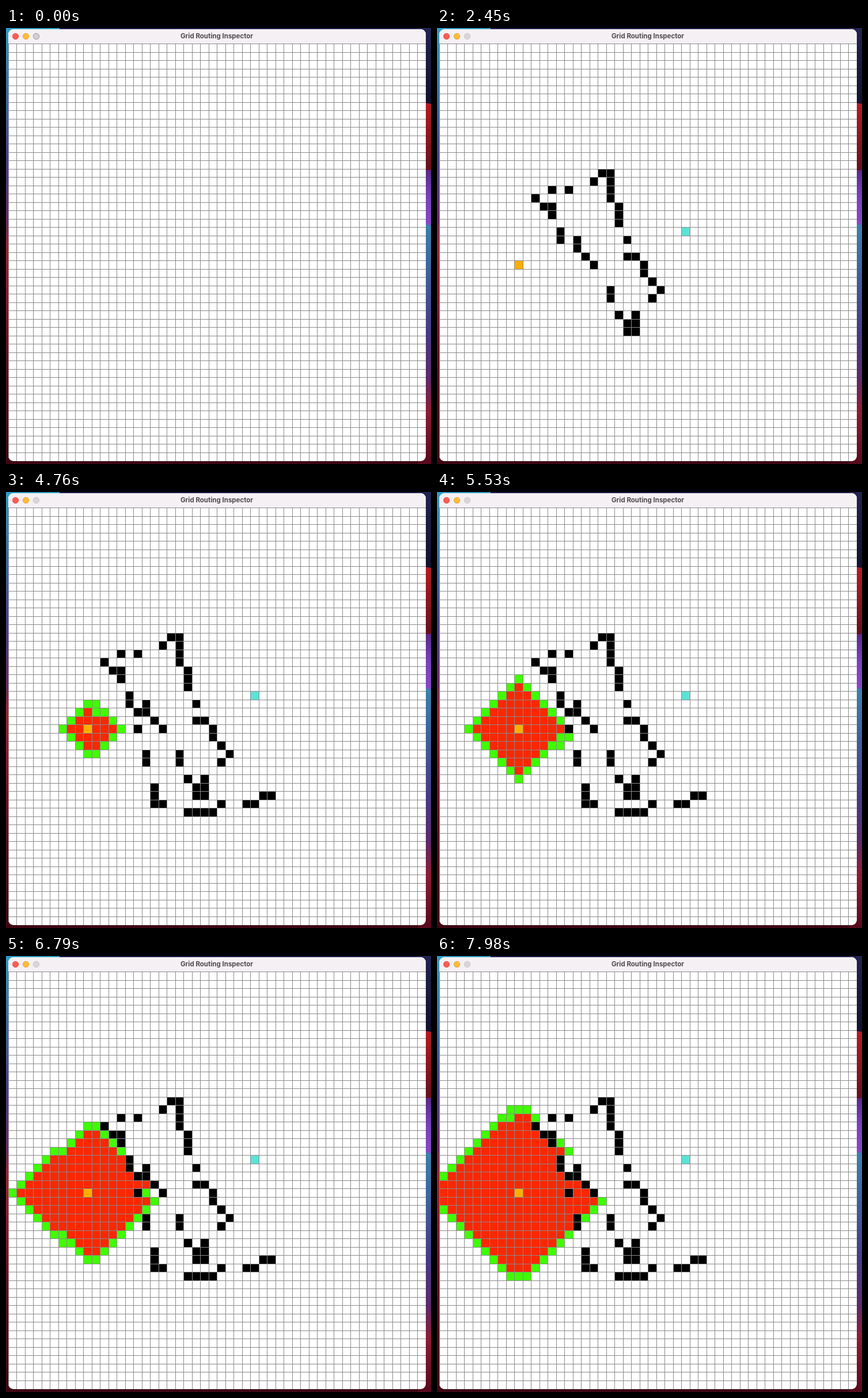
Animation of 738 by 758 pixels, one loop 8 s. Source, as an HTML page:

```html
<!DOCTYPE html>
<html lang="en">
<head>
<meta charset="utf-8">
<title>Grid Routing Inspector</title>
<style>
  html, body { margin: 0; width: 100%; height: 100%; overflow: hidden; background: #3f0714; }
  svg { display: block; position: absolute; left: 0; top: 0; }
  text { font: 700 11.5px Inter, "Open Sans", sans-serif; fill: #4d494d; }
</style>
</head>
<body>
<svg width="738" height="758" viewBox="0 0 738 758">
  <defs>
    <linearGradient id="left" x1="0" y1="0" x2="0" y2="1">
      <stop offset="0" stop-color="#2c9cc4"/>
      <stop offset=".12" stop-color="#3578ae"/>
      <stop offset=".3" stop-color="#47408c"/>
      <stop offset=".44" stop-color="#6a2a66"/>
      <stop offset=".5" stop-color="#a0242e"/>
      <stop offset=".6" stop-color="#93182a"/>
      <stop offset=".8" stop-color="#5c0a1a"/>
      <stop offset="1" stop-color="#3f0714"/>
    </linearGradient>
    <linearGradient id="navy" x1="0" y1="0" x2="0" y2="1">
      <stop offset="0" stop-color="#23244f"/><stop offset="1" stop-color="#12122e"/>
    </linearGradient>
    <linearGradient id="red" x1="0" y1="0" x2="0" y2="1">
      <stop offset="0" stop-color="#b51d22"/><stop offset="1" stop-color="#64101e"/>
    </linearGradient>
    <linearGradient id="violet" x1="0" y1="0" x2="0" y2="1">
      <stop offset="0" stop-color="#5a2a88"/><stop offset=".5" stop-color="#7a40bc"/><stop offset="1" stop-color="#8549c6"/>
    </linearGradient>
    <linearGradient id="blue" x1="0" y1="0" x2="0" y2="1">
      <stop offset="0" stop-color="#3a83ac"/>
      <stop offset=".25" stop-color="#3f5a98"/>
      <stop offset=".45" stop-color="#473a84"/>
      <stop offset=".64" stop-color="#5c2a6a"/>
      <stop offset=".78" stop-color="#8e1c36"/>
      <stop offset="1" stop-color="#560a1c"/>
    </linearGradient>
    <clipPath id="frame"><rect x="4" y="2" width="725" height="751" rx="9"/></clipPath>
  </defs>
  <rect width="738" height="758" fill="#3f0714"/>
  <rect width="12" height="758" fill="url(#left)"/>
  <rect width="93" height="12" fill="#2c9cc4"/>
  <rect x="93" width="645" height="12" fill="#1b1c42"/>
  <rect x="715" width="23" height="132" fill="url(#navy)"/>
  <path d="M715 128L738 132V248H715Z" fill="url(#red)"/>
  <rect x="715" y="247" width="23" height="96" fill="url(#violet)"/>
  <path d="M715 338L738 343V758H715Z" fill="url(#blue)"/>
  <g clip-path="url(#frame)">
    <rect x="4" y="2" width="725" height="751" fill="#fff"/>
    <rect x="4" y="2" width="725" height="25" fill="#f4f0f3"/>
    <g shape-rendering="crispEdges">
      <path id="open" fill="#40fc00"/>
      <path id="closed" fill="#f92800"/>
      <path id="wall" fill="#000"/>
      <path id="start" fill="#ffae00"/>
      <path id="end" fill="#5ae2d6"/>
      <path id="lines" fill="#8a8a8a"/>
    </g>
  </g>
  <g stroke-width=".8">
    <circle cx="16.5" cy="14.5" r="5.2" fill="#fc5c56" stroke="#dd4742"/>
    <circle cx="34.5" cy="14.5" r="5.2" fill="#fdbb37" stroke="#dea02c"/>
    <circle id="zoom" cx="52.5" cy="14.5" r="5.2"/>
  </g>
  <text x="366" y="18.3" text-anchor="middle">Grid Routing Inspector</text>
</svg>
<script>
const LOOP = 8000, TICK = 70, N = 50, PITCH = 14.5;
const START = [9, 26], END = [29, 22];
const $ = id => document.getElementById(id);
const cells = s => s.split(' ').map(p => p.split(',').map(Number));

// Wall strokes: begin time, number of ticks, cells in drawing order
const strokes = [
  [1330, 3, cells('16,23 16,24 17,25 18,26 20,29 20,30 21,32 22,33 22,34')],
  [1610, 3, cells('23,34 23,33 23,32 25,30 26,29')],
  [1820, 14, cells('25,28 24,27 24,26 23,25 22,25 22,23 21,21 21,20 21,19 20,18 20,17 20,16 20,15 19,15 18,16 ' +
    '15,17 13,17 11,18 12,19 13,19 13,20 14,22 14,23 15,24 15,26 16,29 16,30 17,33 17,34 17,35 18,35')],
  [4060, 4, cells('21,36 22,36 23,36 24,36 25,35 28,35 29,35 30,34 31,34')]
];

const px = c => Math.floor(4 + PITCH * c);
const py = r => Math.floor(27.5 + PITCH * r);
const box = (x, y, x2, y2) => `M${x} ${y}H${x2}V${y2}H${x}Z`;
const square = ([c, r]) => box(px(c), py(r), px(c + 1), py(r + 1));
const paint = (id, list) => $(id).setAttribute('d', list.map(square).join(''));

// Breadth-first search; reach[n] is how many cells are known after visit n
function search() {
  const seen = new Set([START, ...strokes.flatMap(s => s[2])].map(String));
  const queue = [START], reach = [];
  for (let n = 0; n < queue.length; n++) {
    const [c, r] = queue[n];
    if (c === END[0] && r === END[1]) break;
    for (const [dc, dr] of [[1, 0], [-1, 0], [0, 1], [0, -1]]) {
      const next = [c + dc, r + dr];
      if (Math.min(...next) < 0 || Math.max(...next) >= N || seen.has(String(next))) continue;
      seen.add(String(next));
      queue.push(next);
    }
    reach.push(queue.length);
  }
  return { queue, reach };
}
const { queue, reach } = search();

function drawLines() {
  let d = '';
  for (let i = 0; i < N; i++) {
    d += box(px(i), 27, px(i) + 1, 753) + box(4, py(i), 729, py(i) + 1);
  }
  $('lines').setAttribute('d', d);
}

function render(time) {
  const t = Math.floor(time / TICK) * TICK;
  const shown = strokes.flatMap(([t0, ticks, list]) => {
    const k = Math.floor((t - t0) / TICK) + 1;
    return list.slice(0, Math.ceil(list.length * Math.max(0, Math.min(1, k / ticks))));
  });
  const visit = Math.floor(61.2 + (t - 5530) / 17.63);
  paint('wall', shown);
  paint('closed', visit > 0 ? queue.slice(1, visit) : []);
  paint('open', visit >= 0 ? queue.slice(Math.max(1, visit), reach[visit]) : []);
  paint('start', t >= 70 ? [START] : []);
  paint('end', t >= 840 ? [END] : []);
  $('zoom').setAttribute('fill', t < 70 ? '#d2d0d2' : '#d9d5d8');
  $('zoom').setAttribute('stroke', t < 70 ? '#858285' : '#c2bec1');
}

let last = -1;
function loop() {
  const time = performance.now() % LOOP, tick = Math.floor(time / TICK);
  if (tick !== last) render(time);
  last = tick;
  requestAnimationFrame(loop);
}
drawLines();
loop();
</script>
</body>
</html>
```
